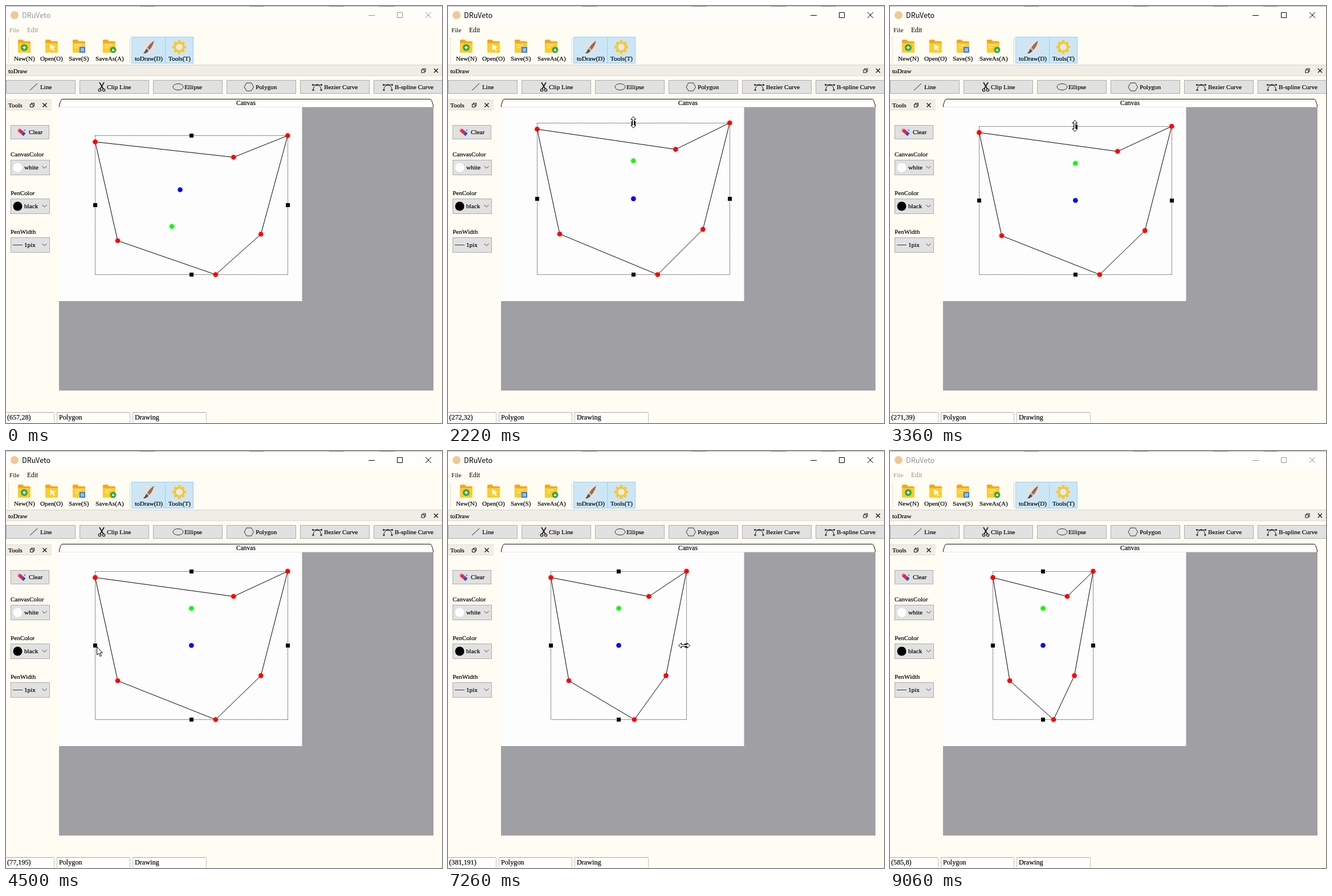
Write an HTML page that moves like this. It is 765x732 px and loops after 9.24 s.

```html
<!DOCTYPE html>
<html lang="en">
<head>
<meta charset="utf-8">
<title>DRuVeto</title>
<style>
  html, body { margin: 0; width: 100%; height: 100%; overflow: hidden; background: #fffcf3; }
  svg { display: block; width: 765px; height: 732px; }
  text { font-family: "Liberation Serif", "Times New Roman", serif; font-size: 11.2px; fill: #000; stroke: #000; stroke-width: .2px; white-space: pre; }
  #app { font: 12.6px "Noto Sans CJK SC", "Noto Sans", sans-serif; }
  .status { font-size: 12.2px; }
  #chrome text { fill: inherit; stroke: none; }
</style>
</head>
<body>
<svg id="stage" viewBox="0 0 765 732" xmlns="http://www.w3.org/2000/svg"></svg>
<script>
const LOOP = 9240, STEP = 60, SCALE = 0.861;
const stage = document.getElementById('stage');

// ---------- static window ----------
const rect = (x, y, w, h, fill, stroke) => stroke
  ? `<rect x="${x + .5}" y="${y + .5}" width="${w - 1}" height="${h - 1}" fill="${fill}" stroke="${stroke}"/>`
  : `<rect x="${x}" y="${y}" width="${w}" height="${h}" fill="${fill}"/>`;
const path = (d, stroke = '#000', width = 1, fill = 'none') =>
  `<path d="${d}" stroke="${stroke}" stroke-width="${width}" fill="${fill}"/>`;
const disc = (x, y, r, fill, more = '') => `<circle cx="${x}" cy="${y}" r="${r}" fill="${fill}" ${more}/>`;
const text = (x, y, str, more = '') => `<text x="${x}" y="${y}" ${more}>${str}</text>`;
const at = (x, y, body, more = '') => `<g transform="translate(${x} ${y}) ${more}">${body}</g>`;

const button = (x, y, w, h) => rect(x, y, w, h, '#e1e1e1', '#adadad');
const folder = path('M-11-10q0-2 2-2h6l3 3h9q2 0 2 2v16q0 2-2 2h-18q-2 0-2-2z', 'none', 0, '#f7a51c')
  + path('M-11-5q0-1 1-1h20q1 0 1 1v14q0 2-2 2h-18q-2 0-2-2z', 'none', 0, '#ffcb2b');
const dockIcons = (x, y, dx) =>
  path(`M${x - 1.5} ${y - 1.5}v-2h5v5h-2M${x - 3.5} ${y - 1.5}h5v5h-5z`, '#222', 1.1)
  + path(`M${x + dx - 3.5} ${y - 3.5}l7 7m0-7l-7 7`, '#222', 1.5);

function titleBar() {
  return rect(0, 0, 765, 31, '#fffefb') + rect(0, 0, 765, 1, '#b9b7b4')
    + [235, 427, 567, 655].map(x => rect(x, 0, 26, 1, '#77757a')).join('')
    + disc(15, 16, 7, '#f0c896')
    + `<g id="chrome">${text(28, 21, 'DRuVeto', 'id="app"')}${text(6, 46, 'File')}${text(37, 46, 'Edit', 'style="font-size:11.6px"')}
       <path d="M636 16.5h11M686.5 11.5h9v9h-9zM736 11l10 10m0-10l-10 10" fill="none"/></g>`;
}

function toolBar() {
  const doc = rect(1, 1, 10, 10, '#2d7ff0') + path('M3 4h6M3 6h6M3 8h6', '#fff', 1);
  const teeth = Array.from({ length: 8 }, (_, i) =>
    `<rect x="-2.500" y="-12" width="5" height="7" rx="1" fill="#fcc62d" transform="rotate(${i * 45})"/>`).join('');
  const brush = disc(0, 0, 11.5, '#dce3e6')
    + path('M10-11Q3-7-2 1L2 5Q8-2 10-11z', 'none', 0, '#a8663f')
    + path('M-2 1L2 5L0 7L-4 3z', 'none', 0, '#b5bcc2')
    + path('M-4 3L0 7Q-4 12-9 11Q-6 8-4 3z', 'none', 0, '#6b4a3c');
  return path('M4.5 56v44', '#a9a59c', 1).replace('/>', ' stroke-dasharray="1 2"/>')
    + path('M217.5 56v44', '#d5d2cb')
    + rect(220, 54, 60, 47, '#cce6f5', '#99d1f7') + rect(279, 54, 50, 47, '#cce6f5', '#99d1f7')
    + at(32, 71, folder + disc(0, 2, 6, '#2fa84f') + path('M-3 2h6M0-1v6', '#fff', 1.5))
    + at(80, 71, folder + path('M-3-4l10 5-4 1.500 3 4-2 1.500-3-4-3 3z', 'none', 0, '#fffdf0'))
    + at(128, 71, folder + path('M-7-2h11M-7 2h6', '#fff3c0', 1.5) + doc)
    + at(181, 71, folder + path('M-7-2h11M-7 2h6', '#fff3c0', 1.5) + disc(7, 6, 5.5, '#36a93f') + path('M4.500 8L7 3.500L9.500 8z', 'none', 0, '#fff'))
    + at(250, 72, brush)
    + at(304, 72, teeth + disc(0, 0, 9, '#fcc62d') + disc(0, 0, 5.8, '#e3edf0'))
    + [[14, 'New(N)'], [60, 'Open(O)'], [110, 'Save(S)'], [157, 'SaveAs(A)'], [226, 'toDraw(D)'], [285, 'Tools(T)']]
      .map(([x, s]) => text(x, 96, s)).join('')
    + rect(0, 103, 765, 20, '#f0ede6') + rect(0, 103, 765, 1, '#d4d1ca') + rect(0, 122, 765, 1, '#dedbd3')
    + text(4, 118, 'toDraw') + dockIcons(732.5, 113.5, 22);
}

function drawBar() {
  const curve = path('M-7 6Q-7-3 0-3Q7-3 7 6M-6-3.500H6', '#222', 1)
    + [[-9, -5], [-1.5, -5], [6, -5], [-8.5, 4], [5.5, 4]].map(([x, y]) => rect(x, y, 3, 3, '#444')).join('');
  const scissors = path('M-4-8L3 4M4-8L-3 4', '#222', 1.8)
    + disc(-3.5, 5.5, 2.2, 'none', 'stroke="#222" stroke-width="1.3"')
    + disc(3.5, 5.5, 2.2, 'none', 'stroke="#222" stroke-width="1.3"');
  const items = [
    ['Line', 60, path('M42 148L55 136', '#222')],
    ['Clip Line', 177, at(168, 142, scissors)],
    ['Ellipse', 313, '<ellipse cx="302" cy="142" rx="9" ry="5.500" fill="none" stroke="#333"/>'],
    ['Polygon', 438, path('M418 142l4-7h8.500l4 7-4 7h-8.500z', '#333')],
    ['Bezier Curve', 558, at(546, 142, curve)],
    ['B-spline Curve', 682, at(670, 142, curve)]
  ];
  return items.map(([s, x, icon], i) => button(Math.floor(i * 129.1), 130, 122, 24) + icon + text(x, 146, s)).join('');
}

function sidePanel() {
  const combo = (label, y, value, icon) => text(8, y, label) + button(8, y + 6, 69, 27) + icon
    + text(32, y + 23, value) + path(`M63.500 ${y + 17}l4 4 4-4`, '#444');
  return rect(0, 164, 80, 19, '#f0ede6') + rect(0, 164, 80, 1, '#e0ddd5') + rect(0, 182, 80, 1, '#e0ddd5')
    + text(4, 178, 'Tools') + dockIcons(46, 174, 22)
    + button(8, 209, 68, 25)
    + at(28, 222, rect(-7, -3, 8, 6, '#e8264c') + rect(1, -3, 5, 6, '#3a4fb0') + path('M-7 3l-2-3 2-3', '#f58aa0', 1, '#f58aa0'), 'rotate(40)')
    + disc(33, 218, 1.5, '#36a8e8') + text(40, 225, 'Clear')
    + combo('CanvasColor', 264, 'white', disc(20.5, 283.5, 8, '#fdfdfd'))
    + combo('PenColor', 332, 'black', disc(20.5, 351.5, 8, '#000'))
    + combo('PenWidth', 400, '1pix', path('M12 419.500h17', '#333'));
}

function workArea() {
  return path('M93.500 178V174L96 166.500Q97 163.500 99 163.500H744Q746 163.500 747 166.500L749.500 174V178', '#111', 1, '#fffefb')
    + text(404, 174, 'Canvas', 'style="font-size:11.500px"')
    + rect(93, 177.5, 657, 497.5, '#a09fa3') + rect(93, 177.5, 426.5, 340.5, '#fdfdfd');
}

function statusBar() {
  const cell = (x, r) => rect(x, 713, r - x, 18, '#fffefb') + path(`M${x} 713.500H${r}`, '#aaa7a0')
    + path(`M${x + .5} 714V731M${r + .5} 714V731`, '#c4c1ba');
  return cell(-1, 84) + cell(89, 217) + cell(222, 351)
    + text(2, 726, '', 'id="coords" class="status"')
    + text(93, 726, 'Polygon', 'class="status"') + text(226, 726, 'Drawing', 'class="status"');
}

const red = Array.from({ length: 6 }, () => disc(0, 0, 4.3, '#f00', 'class="node"')).join('');
const grips = Array.from({ length: 4 }, () => '<rect class="grip" width="7" height="7"/>').join('');
const doubleArrow = 'M0-10L4.500-5H1.500V5H4.500L0 10L-4.500 5H-1.500V-5H-4.500z';

stage.innerHTML = rect(0, 0, 765, 732, '#fffcf3') + titleBar() + toolBar() + drawBar() + sidePanel() + workArea() + statusBar()
  + '<rect id="frame" fill="none" stroke="#000" stroke-dasharray="1 1.320"/>' + grips
  + at(.5, .5, '<polygon id="shape" fill="none" stroke="#000" stroke-linejoin="round"/>'
    + disc(0, 0, 4.3, '#00f', 'id="center"') + disc(0, 0, 4.3, '#0f0', 'id="pivot"') + red)
  + `<g id="cursor" stroke="#000" fill="#fff"><path id="arrow" d="M.5.500V15L3.700 12 6.200 17.500 8.400 16.500 6 11.200H10.300z"/><path id="resize" d="${doubleArrow}"/></g>`;

// ---------- motion ----------
// time, mouse x, mouse y in canvas units, easing towards this key
const TRACK = [
  [120, 668, -103], [1020, 271, 58], [1080, 272, 58], [1800, 272, 58], [2280, 272, 31],
  [2460, 272, 31], [2760, 272, 84, 'in'], [2880, 272, 94, 'out'], [3060, 272, 94], [3360, 271, 39],
  [3660, 271, 39], [4500, 77, 195], [4680, 77, 195], [4800, 75, 193], [5400, 75, 193],
  [5460, 90, 193], [5520, 103, 193], [5880, 103, 193], [6240, 438, 195, 'in'], [6480, 469, 191, 'out'],
  [7020, 469, 191], [7260, 381, 191, 'in'], [7800, 309, 191, 'out'],
  [8100, 309, 191], [8160, 380, 140], [8220, 585, 8], [8280, 777, -120]
];
const EASE = { in: u => u * u, out: u => u * (2 - u), both: u => u * u * (3 - 2 * u) };
const mix = (a, b, u) => a + (b - a) * u;
const clamp = (v, lo, hi) => Math.min(hi, Math.max(lo, v));

function mouse(t) {
  t = clamp(t, TRACK[0][0], TRACK[TRACK.length - 1][0]);
  const i = Math.max(1, TRACK.findIndex(k => k[0] >= t));
  const a = TRACK[i - 1], b = TRACK[i];
  const u = EASE[b[3] || 'both']((t - a[0]) / (b[0] - a[0]));
  return { x: mix(a[1], b[1], u), y: mix(a[2], b[2], u) };
}

// piecewise linear, extended past both ends
function bend(v, knots, vals) {
  let i = 1;
  while (i < knots.length - 1 && v > knots[i]) i++;
  return mix(vals[i - 1], vals[i], (v - knots[i - 1]) / (knots[i] - knots[i - 1]));
}

const $ = id => document.getElementById(id);
const nodes = [...document.querySelectorAll('.node')], gripEls = [...document.querySelectorAll('.grip')];
const set = (el, attrs) => { for (const k in attrs) el.setAttribute(k, attrs[k]); };
const place = (el, [x, y]) => set(el, { cx: x, cy: y });

const BOTTOM = 471;
const TOPS = [211, 227, 249], LEFTS = [156, 180], RIGHTS = [356, 418, 494];

function drawShape(t) {
  const top = 227 + (mouse(clamp(t, 1800, 3360)).y - 58) * SCALE;
  const left = 156 + (mouse(clamp(t, 4800, 5520)).x - 75) * SCALE;
  const right = 418 + (mouse(clamp(t, 7020, 7800)).x - 381) * SCALE;
  const px = (atLeft, ...atRight) =>
    bend(right, RIGHTS, atRight) + bend(left, LEFTS, [atLeft - atRight[2], 0]);
  const py = (...v) => bend(top, TOPS, v);
  const pts = [
    [left, py(222, 238, 260)],
    [px(399, 310.5, 352, 406), py(255, 265, 286)],
    [right, top],
    [px(447, 323, 382, 451), py(394, 400, 404)],
    [px(367.5, 286.5, 326.5, 376), BOTTOM],
    [px(195.5, 209.5, 211.5, 218.5), py(403, 411.5, 413)]
  ];
  pts.forEach((p, i) => place(nodes[i], p));
  set($('shape'), { points: pts.join(' ') });
  const x = Math.round(left) + .5, y = Math.round(top) + .5;
  set($('frame'), { x, y, width: Math.round(right - left), height: BOTTOM + .5 - y });

  const cx = (left + right) / 2, cy = (top + BOTTOM) / 2;
  [[cx, top], [cx, BOTTOM], [left, cy], [right, cy]].forEach(([gx, gy], i) =>
    set(gripEls[i], { x: Math.round(gx - 3), y: Math.round(gy - 3) }));
  const picked = t >= 1560;
  place($('center'), picked ? [cx, cy] : [305, 322]);
  place($('pivot'), picked ? [cx, top + (BOTTOM - top) / 4] : [290.5, 386.5]);
}

function drawCursor(t) {
  const vertical = t >= 1020 && t < 3540;
  const resizing = vertical || (t >= 4740 && t < 5760) || (t >= 6420 && t < 8160);
  const m = mouse(resizing && t > 1800 ? t + 20 : t);
  const x = 93 + m.x * SCALE, y = 175.5 + m.y * SCALE;
  $('cursor').style.display = t >= 120 && t < 8520 ? '' : 'none';
  $('arrow').style.display = resizing ? 'none' : '';
  $('resize').style.display = resizing ? '' : 'none';
  set($('arrow'), { transform: `translate(${Math.round(x - .5)} ${Math.round(y)})` });
  set($('resize'), { transform: `translate(${x - 2} ${y + 1.5}) rotate(${vertical ? 0 : 90})` });
}

function drawLabels(t) {
  const m = mouse(t);
  const inside = t >= 120 && m.y >= 0;
  const [x, y] = inside ? [m.x, m.y] : t < 4000 ? [657, 28] : [585, 8];
  $('coords').textContent = `(${Math.round(x)},${Math.round(y)})`;
  const ink = t < 1560 || t >= 9060 ? '#959390' : t >= 9000 ? '#555' : '#000';
  set($('chrome'), { fill: ink });
  set($('chrome').querySelector('path'), { stroke: ink });
}

function draw() {
  const t = Math.floor((performance.now() % LOOP) / STEP) * STEP;
  drawShape(t);
  drawCursor(t);
  drawLabels(t);
  requestAnimationFrame(draw);
}
draw();
</script>
</body>
</html>
```
